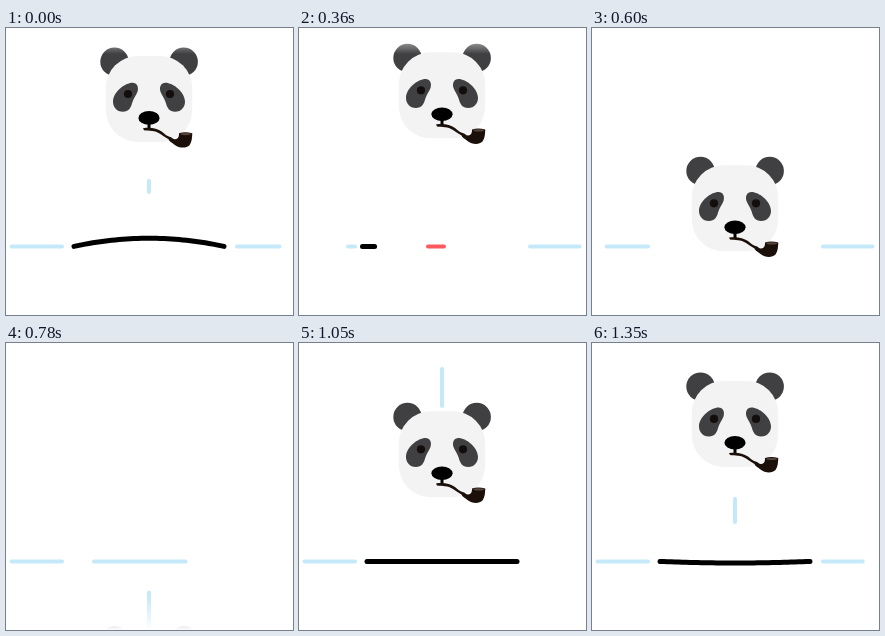
These frames come from a looping animation (287 px wide and 287 px high, 1.38 s). An HTML page:

```html
<!DOCTYPE html>
<html lang="en">
<head>
<meta charset="utf-8">
<title>Panda trampoline</title>
<style>
  html, body { margin: 0; width: 100%; height: 100%; overflow: hidden; background: #fff; }
  svg { display: block; width: 100%; height: 100%; }
  .line { fill: none; stroke-linecap: round; stroke-linejoin: round; stroke-width: 4; stroke: #c6e9f9; }
</style>
</head>
<body>
<svg viewBox="0 0 287 287">
  <defs>
    <linearGradient id="top" x1="0" y1="0" x2="0" y2="1">
      <stop offset=".26" stop-color="#fff"/>
      <stop offset=".58" stop-color="#fff" stop-opacity=".42"/>
      <stop offset="1" stop-color="#fff" stop-opacity="0"/>
    </linearGradient>
    <linearGradient id="bottom" x1="0" y1="0" x2="0" y2="1">
      <stop offset="0" stop-color="#fff" stop-opacity="0"/>
      <stop offset="1" stop-color="#fff"/>
    </linearGradient>
    <g id="side">
      <path d="M126.5 21C131 21 133 25 131.5 30C130 34 127.5 36.5 126.2 41C125 46 122.5 50 117 50C110.5 50 106.8 45 107 39.5C107.5 30 119 21 126.5 21Z" fill="#404042"/>
      <circle cx="122" cy="32.3" r="4.1" fill="#130d0b"/>
    </g>
  </defs>

  <path id="trail" class="line"/>
  <g id="panda">
    <circle cx="108.5" cy="0" r="14.2" fill="#404042"/>
    <circle cx="177.7" cy="0" r="14.2" fill="#404042"/>
    <rect x="99.8" y="-5.7" width="86.4" height="86" rx="32" fill="#f3f3f3"/>
    <use href="#side"/>
    <use href="#side" transform="translate(286 0) scale(-1 1)"/>
    <ellipse cx="143" cy="56.2" rx="10.6" ry="6.8"/>
    <path d="M143 61V67" stroke="#000" stroke-width="3"/>
    <path d="M137 66.5C144 65.5 151 66.3 156 70C159 72.2 161 74.5 163.5 75C166 75.5 167 77.5 169 77.5C173 77 173 74 173 71.5Q179 69.5 186.3 71.5C186 76 186 80 183.5 83.5C180 87 173 86.5 168.5 83C166 81 163 79.5 162.5 77.5C160 76 157 74 154 72C149 68.5 143 69.5 138 68.5Z" fill="#1b0f0a"/>
    <ellipse cx="179.7" cy="72.4" rx="5.3" ry="1.1" fill="#55453d"/>
  </g>
  <rect width="287" height="26" fill="url(#top)"/>
  <rect y="254" width="287" height="33" fill="url(#bottom)"/>

  <path id="left" class="line"/>
  <path id="right" class="line"/>
  <path id="middle" class="line"/>
  <path id="red" class="line" style="stroke:#fc5a5f"/>
  <path id="mat" class="line" style="stroke:#000;stroke-width:5"/>
</svg>
<script>
const LOOP = 1380, STEP = 30, GROUND = 218.4;
const el = id => document.getElementById(id);
const clamp = v => Math.max(0, Math.min(1, v));
const span = (t, a, b) => clamp((t - a) / (b - a));
const mix = (a, b, k) => a + (b - a) * k;
const out = k => Math.sin(k * Math.PI / 2);
const inOut = k => k * k * (3 - 2 * k);

const hLine = (id, a, b) => el(id).setAttribute("d", b > a ? `M${a} ${GROUND}H${b}` : "");
const vLine = (a, b) => el("trail").setAttribute("d", b >= a ? `M143 ${a}V${b + 0.01}` : "");

// Height of the ears: rise, short hang, fall, drop in from above, sink, rise
function pandaY(t) {
  const rise = u => 9.5 + 0.000945 * (u - 160) ** 2;
  if (t < 160) return rise(t);
  if (t < 224) return mix(9.5, 13, inOut(span(t, 160, 224)));
  if (t < 860) return 13 + 0.00092 * (t - 224) ** 2;
  if (t < 1108) {
    const u = t - 1050;
    return 74 + 1.05 * u + 0.00092 * u * u;
  }
  if (t < 1173) return 136 + 28 * Math.sin((t - 1108) / 65 * Math.PI);
  return rise(t - LOOP);
}

// Upward bend of the mat at its centre
function bend(t) {
  const u = t < 700 ? t + LOOP : t;
  if (u < 1108) return 0;
  if (u < 1141) return -28 * out((u - 1108) / 33);
  if (u < 1213) return -28 * Math.cos((u - 1141) / 144 * Math.PI);
  const fade = u > 1389 ? Math.exp((1389 - u) / 130) : 1;
  return 8.9 * fade * Math.sin((u - 1213) / 141 * 2 * Math.PI);
}

function drawMat(a, b, h) {
  let d = "";
  if (b > a) {
    for (let i = 0; i <= 40; i++) {
      const x = mix(a, b, i / 40), u = clamp((x - 68) / 150);
      d += (i ? "L" : "M") + x.toFixed(2) + " " + (GROUND - 4 * h * u * (1 - u)).toFixed(2);
    }
  }
  el("mat").setAttribute("d", d);
}

function drawTrail(t, y) {
  const u = t < 300 ? t + LOOP : t;
  if (u >= 1225) {
    const top = mix(194, 152.5, out(span(u, 1230, 1390)));
    const end = mix(194, 149, span(u, 1320, 1410));
    vLine(top, end);
  } else if (t > 620 && t < 1110) {
    const grow = span(t, 620, 740), shrink = 1 - span(t, 1060, 1110);
    const end = y - 11;
    vLine(end - 37 * grow * shrink, end);
  } else vLine(1, 0);
}

function drawLines(t) {
  if (t < 320) hLine("left", mix(5.5, 56, span(t, 120, 300)), 56);
  else hLine("left", mix(56, 5.5, out(span(t, 320, 780))), 56);

  const r = t < 700 ? t + LOOP : t;
  const slide = inOut(span(t, 620, 800));
  if (t >= 620 && t < 1070) hLine("right", 1, 0);
  else hLine("right", 231, mix(231, 280.5, out(span(r, 1075, 1540))));

  if (t >= 620 && t < 1000) {
    const a = mix(231, 83, slide) - 15 * span(t, 780, 840);
    const b = mix(280.5, 176, slide) + 42 * span(t, 800, 900);
    hLine("middle", Math.max(a, mix(68, 218, span(t, 850, 1000))), b);
  } else hLine("middle", 1, 0);

  if (t >= 300 && t < 450) {
    const a = t < 360 ? mix(204, 129, span(t, 300, 360)) : mix(129, 56, span(t, 360, 430));
    hLine("red", a, mix(a + 16, 56, span(t, 390, 450)));
  } else hLine("red", 1, 0);

  if (t < 400) drawMat(mix(68, 63.5, span(t, 200, 350)), mix(218, 56, span(t, 200, 382)), bend(t));
  else if (t > 850) drawMat(68, mix(68, 218, span(t, 850, 1000)), bend(t));
  else drawMat(1, 0, 0);
}

function draw(t) {
  const y = pandaY(t);
  el("panda").setAttribute("transform", `translate(0 ${y.toFixed(2)})`);
  drawTrail(t, y);
  drawLines(t);
}

const start = performance.now();
function tick() {
  const t = (performance.now() - start) % LOOP;
  draw(Math.floor(t / STEP) * STEP);
  requestAnimationFrame(tick);
}
tick();
</script>
</body>
</html>
```
